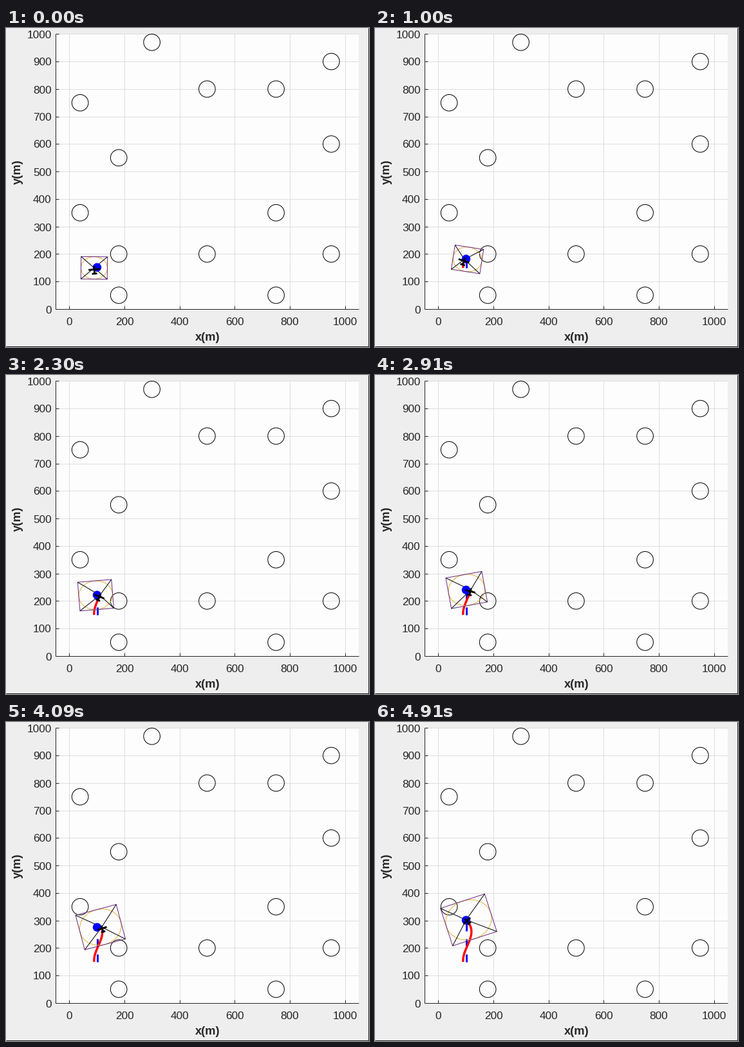
A matplotlib script for the animation above (5 s loop, 564 by 496 pixels).

```python
import numpy as np
import matplotlib.pyplot as plt
from matplotlib.animation import FuncAnimation
from matplotlib.patches import Circle, Ellipse, Rectangle

W, H, DPI = 564, 496, 64
PX = 72 / DPI                      # points per pixel
LOOP, FRAMES, STEPS = 5000, 200, 65
INK, GRID = "#262626", "#dedede"

plt.rcParams["font.family"] = "Liberation Sans"
fig = plt.figure(figsize=(W / DPI, H / DPI), dpi=DPI, facecolor="#eeeeee")
ax = fig.add_axes([0, 0, 1, 1])
ax.set_xlim(0, W)
ax.set_ylim(H, 0)
ax.axis("off")


def px_x(v):
    return 98 + 0.4288 * v


def px_y(v):
    return 436.9 - 0.4275 * v


def line(xs, ys, color, width=1, z=2, **kw):
    return ax.plot(xs, ys, color=color, lw=width * PX, zorder=z,
                   solid_capstyle="butt", **kw)[0]


def label(x, y, s, size, **kw):
    ax.text(x, y, s, fontsize=size * PX, color=INK, va="baseline",
            rotation_mode="anchor", **kw)


# Plot area, grid and axes
LEFT, RIGHT, TOP, BOTTOM = 77, 548, 9, 437
ax.add_patch(Rectangle((LEFT, TOP), RIGHT - LEFT, BOTTOM - TOP,
                       fc="#fdfdfd", ec="none", zorder=0))
for v in range(0, 1001, 200):
    x = round(px_x(v))
    line([x, x], [TOP, BOTTOM], GRID, z=1)
    line([x, x], [BOTTOM - 5, BOTTOM], INK)
    label(x, 462.2, str(v), 17.2, ha="center")
for v in range(0, 1001, 100):
    y = round(px_y(v))
    line([LEFT, RIGHT], [y, y], GRID, z=1)
    line([LEFT, LEFT + 5], [y, y], INK)
    label(70.5, y + 6.5, str(v), 17.2, ha="right")
line([LEFT, LEFT], [TOP, BOTTOM], INK)
line([LEFT, RIGHT], [BOTTOM, BOTTOM], INK)
label(313, 485.5, "x(m)", 18.3, ha="center", weight="bold")
label(22.5, 223.5, "y(m)", 18.3, ha="center", weight="bold", rotation=90)

# Window edge
line([W - 1, W - 1], [0, H], "#333333")
line([0, W], [H - 1, H - 1], "#222222")

# Obstacles, by column
OBSTACLES = {40: (350, 750), 180: (50, 200, 550), 300: (970,),
             500: (200, 800), 750: (50, 350, 800), 950: (200, 600, 900)}
for ox, column in OBSTACLES.items():
    for oy in column:
        ax.add_patch(Circle((px_x(ox), px_y(oy)), 12.8, fill=False,
                            ec="black", lw=PX, zorder=3))

# Flight: the aircraft weaves around the goal's straight path
GOAL_X, START_Y = 141.5, 373
k = np.arange(STEPS)
sway = 3.1e-4 * (k - 20) * (64 - k) * (k + 11.4)
path = np.column_stack([GOAL_X + sway, START_Y - 1.02 * k])
vx, vy = np.gradient(path, axis=0).T
heading = np.degrees(np.arctan2(vx, -vy))

# Camera footprint: widens with height, swings and slides with the bank
width = 41 + 31.2 * (k / 64) ** 1.3
size = np.column_stack([width, 0.85 * width])
tilt = 16 * np.exp(-((k - 18) / 10) ** 2) - 18 * k / 64
slide = np.interp(k, [0, 14, 21, 30, 45, 64], [0, 5.2, 4.5, -6.5, -6.3, 4])
centre = path + np.column_stack([slide, 0 * slide])

# Wing, fuselage and tail of an aircraft heading up
GAP = [np.nan, np.nan]
AIRCRAFT = np.array([[-9, 2.5], [9, 2.5], GAP, [0, -3], [0, 9.5], GAP,
                     [-4, 9], [4, 9]])
CORNERS = np.array([[-1, -1], [1, -1], [1, 1], [-1, 1], [-1, -1]]) / 2

plan = line([], [], "#0000ff", 3, 4, linestyle=(0, (4, 4)))
trail = line([], [], "#ff0000", 3.4, 5)
footprint = Ellipse((0, 0), 1, 1, fill=False, ec="#e3b23a", lw=PX, zorder=6)
ax.add_patch(footprint)
frame = line([], [], "#6a2a80", 1, 7)
rays = line([], [], "black", 1, 7)
goal = Circle((GOAL_X, START_Y), 6.7, fc="#0000ff", ec="none", zorder=8)
ax.add_patch(goal)
aircraft = line([], [], "black", 2.8, 9)


def rotate(points, degrees):
    a = np.radians(degrees)
    c, s = np.cos(a), np.sin(a)
    return points @ np.array([[c, s], [-s, c]])


def update(i):
    t = i * LOOP / FRAMES
    n = min(int((t + 24) * STEPS / LOOP), STEPS - 1)

    corners = centre[n] + rotate(CORNERS * size[n], tilt[n])
    frame.set_data(*corners.T)
    spokes = [p for c in corners[:4] for p in (c, path[n], GAP)]
    rays.set_data(*np.array(spokes).T)
    footprint.set_center(centre[n])
    footprint.set_width(size[n, 0])
    footprint.set_height(size[n, 1])
    footprint.set_angle(tilt[n])

    goal_y = START_Y - 0.8 - n
    goal.center = (GOAL_X, goal_y)
    plan.set_data([GOAL_X, GOAL_X], [START_Y, goal_y])
    trail.set_data(*path[:n + 1].T)
    body = rotate(AIRCRAFT * (1 - 0.2 * n / STEPS), heading[n])
    aircraft.set_data(*(path[n] + body).T)
    return plan, trail, footprint, frame, rays, goal, aircraft


anim = FuncAnimation(fig, update, frames=FRAMES, interval=LOOP // FRAMES,
                     repeat=True, repeat_delay=0, blit=False)
plt.show()
```
